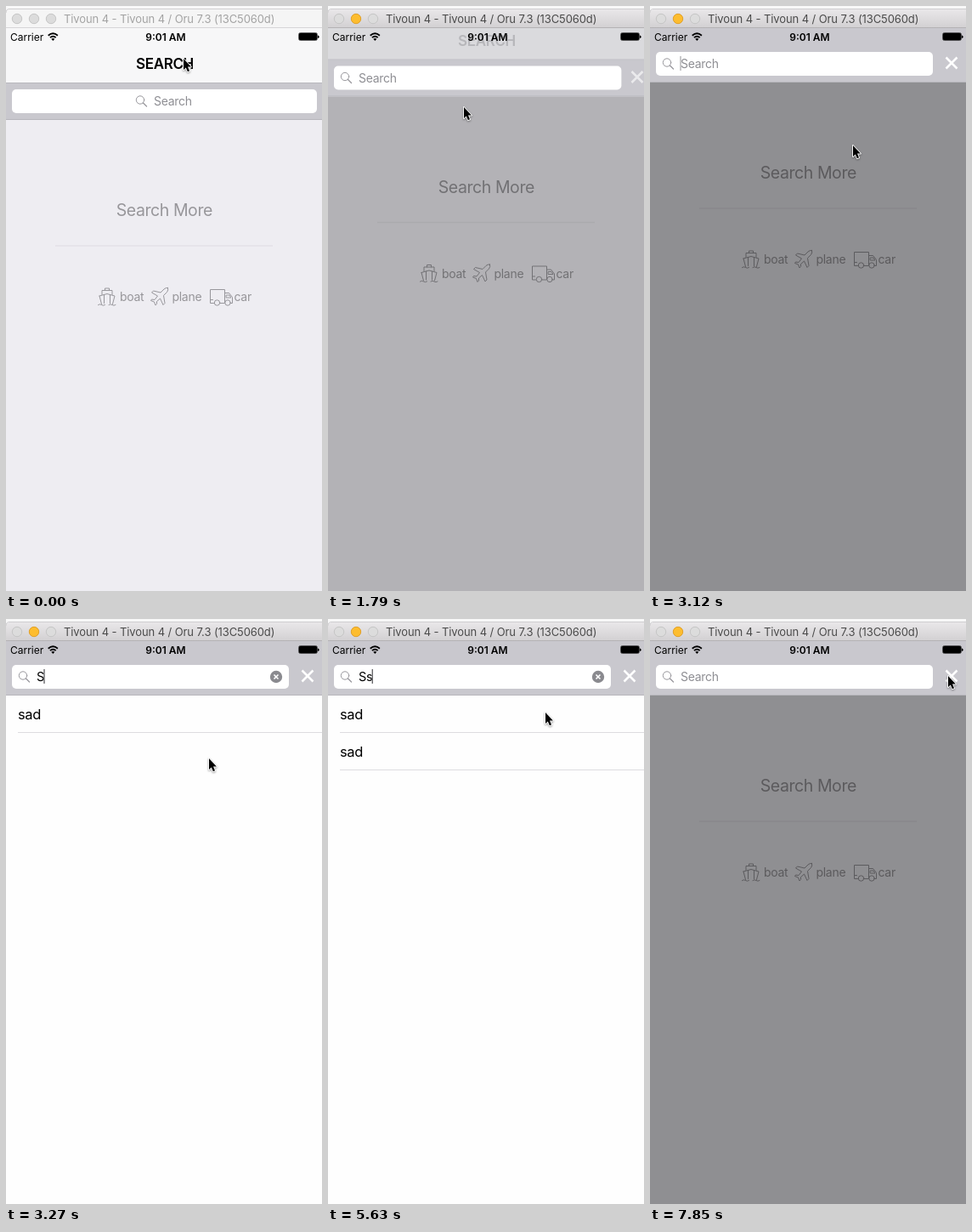
An HTML page that plays this animation: 372 by 688 pixels, repeating every 8000 ms.

```html
<!DOCTYPE html>
<html lang="en">
<head>
<meta charset="utf-8">
<title>Search bar</title>
<style>
  html, body { margin: 0; width: 100%; height: 100%; overflow: hidden; background: #eeedf2; }
  svg { display: block; width: 372px; height: 688px; font-family: Inter, Roboto, sans-serif; }
  .line { fill: none; stroke: #98979c; stroke-linecap: round; stroke-linejoin: round; }
  .hint { fill: #8e8e93; font-size: 14px; letter-spacing: -.3px; }
  .label { fill: #97969a; font-size: 14px; letter-spacing: -.3px; }
  .row { font-size: 16.5px; letter-spacing: -.4px; }
  .lights circle { fill: #dcdcdc; stroke: #c6c6c6; }
  #pointer { filter: drop-shadow(0 1px 1px rgba(0, 0, 0, .4)); }
</style>
</head>
<body>
<svg viewBox="0 0 372 688">
  <defs>
    <linearGradient id="chrome" x2="0" y2="1">
      <stop stop-color="#e9e7e9"/><stop offset="1" stop-color="#d2d0d2"/>
    </linearGradient>
    <clipPath id="screen"><path d="M0 26H372V688H0Z"/></clipPath>
  </defs>
  <rect width="372" height="688" fill="#eeedf2"/>

  <g clip-path="url(#screen)">
    <rect y="26" width="372" height="65" fill="#f7f7f8"/>
    <text id="heading" x="187" y="74" text-anchor="middle" font-size="17" font-weight="600" letter-spacing="-.35">SEARCH</text>
    <rect id="shade" y="26" width="372" height="65" fill="#c9c8ce"/>

    <g id="page">
      <rect y="134" width="372" height="600" fill="#eeedf2"/>
      <text x="186.3" y="247" text-anchor="middle" font-size="19.5" letter-spacing="-.42" fill="#97969a">Search More</text>
      <path d="M58 282H314" stroke="#e3e2e7" stroke-width="1.3"/>
      <g class="line">
        <path d="M116.500 334.500V332H121.500V334.500M113 339.500V334.500H125V339.500M110 341L119 338.500 128 341 125.500 350.500M110 341L112.500 350.500M115.500 339.500V349.500M122.500 339.500V349.500M108.500 351.500Q110.500 350 112.500 351.500T116.500 351.500M121 351.500Q123 350 125 351.500T129 351.500"/>
        <path d="M190.500 331.500Q188 331 186 333L182 337 173.500 335 171.500 337 178.500 341 175 345.500 171.500 345 170.500 346.500 174.500 348 176 352 177.500 350.500 177.500 347.500 181.500 344 185 351.500 187 349.500 185.500 340.500 189.500 336.500Q191.500 334 190.500 331.500Z"/>
        <path d="M244.500 349.500H240.500V333.500H257.500V349.500H252M257.500 337.500H262.500L266.500 342.500V349.500H264.500M259.500 340H263L265 343H259.500ZM240.500 345.500H243.500"/>
        <circle cx="248.500" cy="349" r="3.200"/><circle cx="261" cy="349" r="3.200"/>
      </g>
      <text class="label" x="134" y="347">boat</text>
      <text class="label" x="195.500" y="347">plane</text>
      <text class="label" x="268.500" y="347">car</text>
      <rect id="dim" y="134" width="372" height="600" opacity="0"/>

      <rect y="90" width="372" height="44" fill="#c9c8ce"/>
      <path id="topEdge" d="M0 90.500H372" stroke="#b9b8be"/>
      <path d="M0 133.500H372" stroke="#b7b6bc"/>
      <rect id="field" x="7" y="98" width="359" height="28" rx="5" fill="#fff"/>
      <g id="prompt">
        <circle class="line" cx="20" cy="110.500" r="4.700"/>
        <path class="line" d="M23.500 114L27.500 118" stroke-width="1.300"/>
        <text id="hint" class="hint" x="36" y="117">Search</text>
      </g>
      <text id="query" x="36" y="117" font-size="14.500" letter-spacing="-.3"></text>
      <path id="caret" d="M0 103V120" stroke="#68686c" stroke-width="1.400"/>
      <g id="clear">
        <circle cx="318" cy="112" r="7.200" fill="#8a8a8f"/>
        <path d="M315.500 109.500L320.500 114.500M320.500 109.500L315.500 114.500" stroke="#fff" stroke-width="1.600"/>
      </g>
      <path id="close" d="M348.500 104.500L361.500 117.500M361.500 104.500L348.500 117.500" stroke="#fff" stroke-width="2.500"/>
    </g>

    <g id="list">
      <rect y="90" width="372" height="598" fill="#fefefe"/>
      <text class="row" x="14" y="118">sad</text>
      <path d="M14 133.500H372" stroke="#dddce0"/>
      <g id="second">
        <text class="row" x="14" y="162">sad</text>
        <path d="M14 177.500H372" stroke="#dddce0"/>
      </g>
    </g>

    <text x="5" y="40.500" font-size="12">Carrier</text>
    <g fill="none" stroke="#000" stroke-width="1.800">
      <path d="M49.700 34.700Q55.300 29.800 60.900 34.700M51.900 37.200Q55.300 34.200 58.700 37.200"/>
    </g>
    <path d="M55.300 41L53.300 38.800Q55.300 37.200 57.300 38.800Z"/>
    <text x="188" y="40.500" text-anchor="middle" font-size="12" font-weight="600">9:01 AM</text>
    <rect x="344.500" y="31.500" width="22" height="9" rx="2" fill="none" stroke="#000" stroke-width=".6"/>
    <rect x="345" y="32" width="21" height="8" rx="1"/>
    <path d="M367 34.500Q368.600 34.500 368.600 36.200T367 38Z"/>
  </g>

  <rect width="372" height="5" fill="#f8f8f8"/>
  <path id="bar" d="M0 8Q0 4 4 4H372V26H0Z" fill="#f5f5f5"/>
  <path d="M0 8Q0 3.500 4 3.500H372" fill="none" stroke="#cfced0"/>
  <path id="barEdge" d="M0 25.500H372" stroke="#d6d5d7"/>
  <g class="lights">
    <circle cx="13" cy="15" r="5.700"/>
    <circle id="amber" cx="33" cy="15" r="5.700"/>
    <circle cx="53" cy="15" r="5.700"/>
  </g>
  <text id="caption" x="68" y="20" font-size="13" letter-spacing="-.1">Tivoun 4 - Tivoun 4 / Oru 7.3 (13C5060d)</text>

  <g id="pointer">
    <path d="M0 0V13L2.800 10.400 4.900 15.200 7 14.300 5 9.600H8.900Z" stroke="#fff" stroke-width="1.800" stroke-linejoin="round" paint-order="stroke"/>
  </g>
</svg>
<script>
const $ = id => document.getElementById(id);
const set = (id, attrs) => {
  for (const name in attrs) $(id).setAttribute(name, attrs[name]);
};
const show = (id, on) => set(id, { visibility: on ? 'visible' : 'hidden' });

const LOOP = 8000, TICK = 148.15;
const FOCUS = 11, FIRST_KEY = 22, SECOND_KEY = 30, PRESS = 47, CLEAR = 48;

// pointer stops: tick, x, y
const path = [
  [0, 209, 62], [4, 153, 216], [9, 153, 216], [11, 160, 119],
  [13, 160, 119], [17, 232, 204], [19, 239, 164], [26, 239, 164],
  [30, 250, 129], [33, 250, 129], [36, 256, 110], [41, 256, 110],
  [46, 317, 67], [48, 317, 67], [53, 351, 67]
];
const blink = [1, 1, 1, .6, .2, 0, 0, .5];

function pointerAt(k) {
  const i = Math.max(1, path.findIndex(p => p[0] >= k));
  const [k0, x0, y0] = path[i - 1], [k1, x1, y1] = path[i];
  const f = (k - k0) / (k1 - k0);
  return [x0 + (x1 - x0) * f, y0 + (y1 - y0) * f];
}

function caretAt(k) {
  const start = k >= CLEAR ? CLEAR : 14;
  return k < start ? 0 : blink[(k - start) % blink.length];
}

function draw(k) {
  const active = k >= FOCUS;
  set('bar', { fill: active ? 'url(#chrome)' : '#f5f5f5' });
  set('barEdge', { stroke: active ? '#b4b2b4' : '#d6d5d7' });
  set('caption', { fill: active ? '#4a4a4a' : '#a3a3a3' });
  set('amber', { style: active ? 'fill:#fdbd2f;stroke:#e0a02a' : '' });
  set('prompt', { transform: `translate(${active ? 0 : 138} 0)` });

  // the search bar rises over the heading
  const x = Math.min(1, Math.max(0, (k - FOCUS) / 2));
  const open = x * (2 - x) * .5 + x * .5;
  const rise = `translate(0 ${-44 * open})`;
  set('page', { transform: rise });
  set('heading', { opacity: 1 - open, transform: rise });
  set('shade', { opacity: open });
  set('topEdge', { opacity: 1 - open });
  set('dim', { opacity: .4 * open });
  set('field', { width: 359 - 33 * open });
  set('close', { opacity: open, transform: `translate(${24 * (1 - open)} 0)` });

  const query = k < FIRST_KEY || k >= CLEAR ? '' : k < SECOND_KEY ? 'S' : 'Ss';
  $('query').textContent = query;
  show('hint', !query);
  show('clear', query);
  set('clear', { opacity: k === PRESS ? .65 : 1 });
  show('list', query);
  set('second', { opacity: query.length > 1 ? 1 : 0 });
  set('caret', {
    transform: `translate(${[36, 45, 52.3][query.length]} 0)`,
    opacity: caretAt(k)
  });

  set('pointer', { transform: `translate(${pointerAt(k)})` });
}

function frame() {
  const t = performance.now() % LOOP;
  draw(Math.min(53, Math.floor((t + 6) / TICK)));
  requestAnimationFrame(frame);
}
frame();
</script>
</body>
</html>
```
